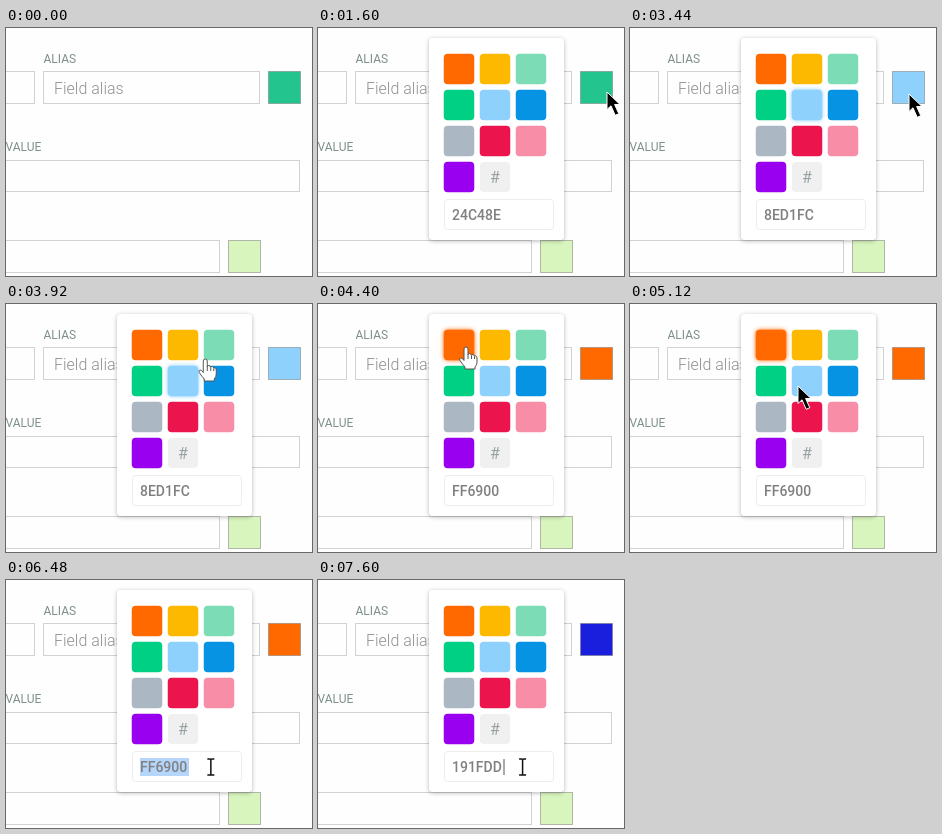
An HTML page for the animation above (8000 ms loop, 306 by 248 pixels).

```html
<!DOCTYPE html>
<html lang="en">
<head>
<meta charset="utf-8">
<title>Colour picker</title>
<style>
  html, body { margin: 0; width: 100%; height: 100%; overflow: hidden; background: #fefefe; }
  svg { display: block; width: 306px; height: 248px; font-family: Roboto, sans-serif; }
  #stage { filter: blur(.4px); }
  .field { fill: #fefefe; stroke: #d2d2d2; }
  .swatch { stroke: #777; stroke-opacity: .5; }
  .label { font-size: 12px; fill: #7f918b; }
  .hint { font-size: 16px; font-weight: 300; fill: #8f8f8f; }
  .panel { fill: #fff; filter: drop-shadow(0 1px 2px rgba(0, 0, 0, .28)); }
  .hex { font-size: 14px; font-weight: 500; fill: #808080; }
</style>
</head>
<body>
<svg viewBox="0 0 306 248">
  <defs>
    <path id="arrow" d="M0 0V17.5L4 13.8L8.2 23.3L11.8 21.7L7.6 12.5H13Z" fill="#000" stroke="#fff"/>
    <g id="hand" fill="#fff" stroke="#555" stroke-linejoin="round">
      <path d="M-2 12V2Q-2 0 0 0T2 2V8Q2 6.500 3.500 6.500T5.500 8.500Q5.500 7.500 7 7.500T8.500 9.500Q9 8.500 10 9T11 11V15Q11 18 9 20V22H-1V20Q-3 18-6 13.500Q-7 11.500-5.500 11T-2 13.500Z"/>
      <path d="M2 8V12M5.500 9V12M8.500 10V12" fill="none"/>
    </g>
    <path id="beam" d="M-3.500-8H-1Q0-8 0-7Q0-8 1-8H3.500M0-7V7M-3.500 8H-1Q0 8 0 7Q0 8 1 8H3.500" fill="none" stroke="#111" stroke-width="1.500"/>
  </defs>

  <g id="stage">
    <rect width="306" height="248" fill="#fefefe"/>
    <rect class="field" x="-9.500" y="43.500" width="38" height="32"/>
    <rect class="field" x="37.500" y="43.500" width="216" height="32"/>
    <rect class="field" x="-9.500" y="132.500" width="303" height="31"/>
    <rect class="field" x="-9.500" y="212.500" width="223" height="32"/>
    <rect class="swatch" id="swatch" x="262.500" y="43.500" width="32" height="32"/>
    <rect class="swatch" x="222.500" y="212.500" width="32" height="32" fill="#d9f5be"/>
    <text class="label" x="37.500" y="35">ALIAS</text>
    <text class="label" x="-.5" y="123">VALUE</text>
    <text class="hint" x="48" y="66">Field alias</text>

    <g id="popup">
      <rect class="panel" x="111" y="10" width="135" height="202" rx="4"/>
      <g id="buttons"></g>
      <rect x="162" y="134" width="30" height="30" rx="4" fill="#f0f0f0"/>
      <text x="177" y="154.500" text-anchor="middle" font-size="16" fill="#98a1a4">#</text>
      <rect x="126.500" y="171.500" width="109" height="30" rx="3" fill="#fff" stroke="#ececec"/>
      <rect id="selection" x="134" y="178" width="49" height="18" fill="#b5d5fb"/>
      <text class="hex" id="hex" x="134" y="191.500"></text>
      <path id="caret" d="M186 179V195" stroke="#555"/>
    </g>
    <use id="cursor"/>
  </g>
</svg>
<script>
const LOOP = 8000, STEP = 80;
const $ = id => document.getElementById(id);
const palette = 'FF6900 FCB900 7BDCB5 00D084 8ED1FC 0693E3 ABB8C3 EB144C F78DA7 9900EF'.split(' ');

// time, x, y, cursor shape
const path = [
  [320, 304, 86, 'arrow'], [480, 289, 65, 'arrow'], [1520, 289, 65, 'arrow'],
  [1600, 289, 64, 'arrow'], [1760, 252, 80, 'arrow'], [2000, 252, 80, 'arrow'],
  [2080, 236, 84, 'arrow'], [2240, 194, 92, 'hand'], [2400, 194, 92, 'hand'],
  [2560, 184, 86, 'hand'], [2800, 182, 82, 'hand'], [2880, 182, 82, 'hand'],
  [2960, 184, 82, 'hand'], [3120, 208, 80, 'hand'], [3200, 208, 80, 'hand'],
  [3280, 245, 72, 'arrow'], [3440, 279, 66, 'arrow'], [3520, 279, 66, 'arrow'],
  [3760, 232, 62, 'arrow'], [3840, 215, 58, 'hand'], [4160, 152, 46, 'hand'],
  [4400, 148, 43, 'hand'], [4960, 148, 43, 'hand'], [5040, 154, 58, 'arrow'],
  [5360, 210, 154, 'arrow'], [5440, 210, 154, 'arrow'], [5600, 232, 178, 'arrow'],
  [5680, 237, 183, 'hand'], [5760, 222, 186, 'beam'], [5840, 205, 187, 'beam'],
  [LOOP, 204.5, 187, 'beam']
];

// time, chosen colour
const choices = [[0, '24C48E'], [2960, '8ED1FC'], [4240, 'FF6900'], [7440, '191FDD']];

$('buttons').innerHTML = palette.map((c, i) =>
  `<rect x="${125.75 + i % 3 * 36}" y="${25.75 + Math.floor(i / 3) * 36}" width="30.5" height="30.5" rx="4" fill="#${c}"/>`
).join('');
const buttons = [...$('buttons').children];

const show = (id, on) => $(id).setAttribute('visibility', on ? 'visible' : 'hidden');
const lastBefore = (list, t) => list.filter(k => k[0] <= t).pop();

function moveCursor(t) {
  const a = lastBefore(path, t);
  show('cursor', a);
  if (!a) return;
  const b = path[path.indexOf(a) + 1] || a;
  const f = b === a ? 0 : (t - a[0]) / (b[0] - a[0]);
  const mix = i => a[i] + (b[i] - a[i]) * f;
  $('cursor').setAttribute('href', '#' + a[3]);
  $('cursor').setAttribute('transform', `translate(${mix(1)} ${mix(2)})`);
}

function draw(now) {
  const t = Math.floor(now % LOOP / STEP) * STEP;
  const color = lastBefore(choices, t)[1];
  $('swatch').setAttribute('fill', '#' + color);
  $('hex').textContent = color;
  $('popup').style.display = t < 480 ? 'none' : '';
  show('selection', t >= 6480 && t < 7440);
  show('caret', t >= 7440);
  buttons.forEach((b, i) => {
    const focused = palette[i] === color && t < 6000;
    b.style.filter = focused ? `drop-shadow(0 0 2px #${color})` : '';
  });
  moveCursor(t);
  requestAnimationFrame(() => draw(performance.now()));
}
draw(performance.now());
</script>
</body>
</html>
```
